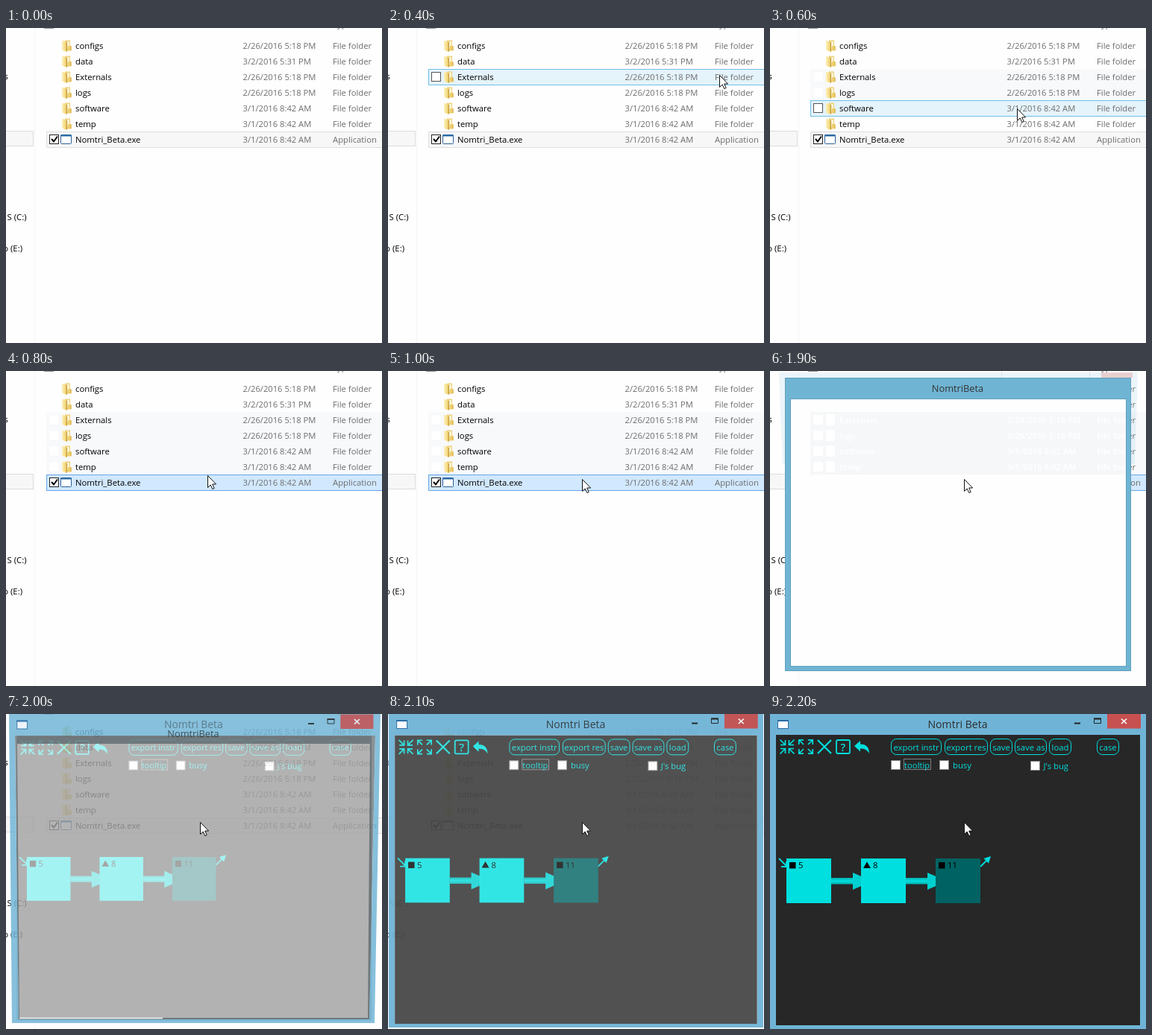
Animation, 504 px wide and 423 px high, one loop 2.5 s. Source, as an HTML page:

```html
<!DOCTYPE html>
<html lang="en">
<head>
<meta charset="utf-8">
<title>Opening an application</title>
<style>
  html, body { margin: 0; width: 100%; height: 100%; overflow: hidden; background: #fefefe; }
  svg { display: block; width: 504px; height: 423px; font: 11.3px "Open Sans", "Noto Sans", sans-serif; }
  text { white-space: pre; }
  .meta { fill: #6d6d6d; }
  .date { font-size: 11.2px; }
  .line { fill: none; stroke: #00dede; }
  .cyan { fill: #00dede; }
</style>
</head>
<body>
<svg viewBox="0 0 504 423">
  <defs>
    <linearGradient id="gold">
      <stop offset="0" stop-color="#fdf1bd"/><stop offset=".6" stop-color="#f5dd88"/><stop offset="1" stop-color="#e2bb4c"/>
    </linearGradient>
    <linearGradient id="shaft" x2="0" y2="1">
      <stop offset="0" stop-color="#00b0b0"/><stop offset=".5" stop-color="#00dede"/><stop offset="1" stop-color="#00b0b0"/>
    </linearGradient>
    <clipPath id="pane"><path d="M28 38H477V396H28Z"/></clipPath>
    <g id="folder">
      <path d="M5 .5H12V14H5Z" fill="#ecd07a"/>
      <path d="M7.5 2H11V13H7.5Z" fill="#fbf3d2"/>
      <path d="M1 .5 7.5 3V16L1 13.5Z" fill="url(#gold)"/>
      <path d="M7.5 3V15.5" stroke="#b9923a" stroke-width=".9"/>
      <path d="M9 8H13.5V14.5H8Z" fill="#efcf6c"/>
      <path d="M13 8.5V14" stroke="#cfa544" stroke-width=".9"/>
    </g>
    <path id="inward" d="M-9.5-9.5-3-3M-9-2.5H-2.5V-9"/>
    <path id="outward" d="M-3-3-9-9M-9.2-3V-9.2H-3"/>
  </defs>

  <g id="explorer">
    <path d="M38.5 0V423" stroke="#f5f5f5"/>
    <path d="M51 0H64" stroke="#707070" stroke-width="1.5"/>
    <text x="438" y="-1" class="meta">Type</text>
    <rect x="-2" y="138.5" width="38.5" height="20" fill="#f7f7f7" stroke="#dcdcdc"/>
    <g text-anchor="end">
      <text x="3" y="69">s</text>
      <text x="27.5" y="258">S (C:)</text>
      <text x="22" y="300">o (E:)</text>
    </g>
    <g id="bands"></g>
    <g id="rows"></g>
  </g>

  <g id="splash">
    <path d="M310.5 0V9M428.5 0V9" stroke="#ececec"/>
    <path d="M12 2H493L489 125H17Z" fill="#6fb4d3" opacity=".13"/>
    <path d="M444 2H486V9H444Z" fill="#e08a80" opacity=".35"/>
    <rect x="20.5" y="9.5" width="463" height="393" fill="#6fb4d3" stroke="#5f9fbc"/>
    <rect x="27.5" y="37.5" width="450" height="359" fill="#fefefe" stroke="#62a0bd"/>
    <rect x="54" y="55" width="423" height="84" fill="#f6f7f9"/>
    <g id="ghosts" fill="#fff" clip-path="url(#pane)"></g>
    <text x="251.5" y="28" font-size="12.8" text-anchor="middle" fill="#333">NomtriBeta</text>
  </g>

  <g id="app">
    <path id="veil" fill="#fff" opacity=".72"/>
    <g id="client">
      <rect x="8" y="28" width="488" height="390" fill="#272727"/>
      <g id="tools"></g>
      <g id="graph"></g>
    </g>
    <path id="ring" fill="#4c5a60" fill-rule="evenodd" opacity=".65"/>
    <path id="frame" fill="#6fb4d6" fill-rule="evenodd"/>
    <g id="bar">
      <rect x="10.5" y="8.5" width="14" height="11" fill="#fff" stroke="#2b6ba5"/>
      <path d="M10 9H25" stroke="#2b6ba5" stroke-width="2"/>
      <text id="title" x="251.5" y="19" font-size="14.1" text-anchor="middle" fill="#2c2c2c">Nomtri Beta</text>
      <path d="M408 12.5H416" stroke="#222" stroke-width="2"/>
      <path d="M434.5 6V12.5H443.5V6Z" fill="none" stroke="#222"/>
      <path d="M434 6.5H444" stroke="#222" stroke-width="2"/>
      <rect x="452" y="0" width="45" height="19.5" fill="#c75050"/>
      <path d="M471 6.5 478 13M478 6.5 471 13" stroke="#fff" stroke-width="1.7"/>
    </g>
    <g id="remains">
      <text x="251" y="31" font-size="12.8" text-anchor="middle" fill="#2c3438" opacity=".8">NomtriBeta</text>
      <path d="M18 408.5H210" stroke="#f4f8fa" stroke-width="1.5"/>
    </g>
  </g>

  <g id="busy" fill="none">
    <circle cx="274.5" cy="145.5" r="5.3" stroke="#2b96dc" stroke-width="4.4"/>
    <path d="M269.2 145.5A5.3 5.3 0 0 1 274.5 140.2" stroke="#58b6ea" stroke-width="3"/>
    <circle cx="274.5" cy="145.5" r="2.9" fill="#eaf5ff"/>
  </g>
  <path id="pointer" d="M.5.5V16.5L4.2 13 6.8 18.6 9.2 17.5 6.7 12H11.6Z" fill="#fff" stroke="#111"/>
</svg>

<script>
const $ = id => document.getElementById(id);

function add(parent, tag, attrs, text) {
  const node = document.createElementNS("http://www.w3.org/2000/svg", tag);
  for (const key in attrs) node.setAttribute(key, attrs[key]);
  if (text) node.textContent = text;
  parent.appendChild(node);
  return node;
}
const show = (node, on) => { node.style.display = on ? "" : "none"; };
const box = (parent, x, y, w, h, attrs) => add(parent, "rect", { x, y, width: w, height: h, ...attrs });
const path = (parent, d, attrs) => add(parent, "path", { d, ...attrs });
const label = (parent, x, y, text, attrs) => add(parent, "text", { x, y, ...attrs }, text);

// File list
const FEB = "2/26/2016 5:18 PM", MAR = "3/1/2016 8:42 AM";
const files = [
  ["configs", FEB], ["data", "3/2/2016 5:31 PM"], ["Externals", FEB], ["logs", FEB],
  ["software", MAR], ["temp", MAR], ["Nomtri_Beta.exe", MAR]
];
const EXE = files.length - 1;
const rowY = i => 24 + 21 * i;

const rows = files.map(([name, date], i) => {
  const y = rowY(i), g = $("rows");
  const band = box($("bands"), 54.5, y - 10.5, 460, 21);
  const check = box(g, 58.5, y - 6.5, 12, 12, { fill: "#fff" });
  if (i === EXE) {
    path(g, `M61 ${y - 1}l3 3.5 5-7`, { fill: "none", stroke: "#000", "stroke-width": 2 });
    box(g, 73.5, y - 6.5, 14, 12, { fill: "#fff", stroke: "#2b5f96", rx: 1 });
    path(g, `M73 ${y - 5.5}h15`, { stroke: "#2b6ba5", "stroke-width": 2 });
  } else {
    add(g, "use", { href: "#folder", x: 74, y: y - 8 });
  }
  label(g, 93, y + 4, name);
  label(g, 317.5, y + 4, date, { class: "meta date" });
  label(g, 438, y + 4, i === EXE ? "Application" : "File folder", { class: "meta" });
  return { band, check };
});

for (let i = 2; i < EXE; i++) {
  const y = rowY(i), g = $("ghosts");
  box(g, 58, y - 7, 13, 13);
  box(g, 75, y - 8, 12, 15);
  label(g, 93, y + 4, files[i][0], { "font-weight": 600 });
  label(g, 317.5, y + 4, files[i][1], { class: "date", "font-weight": 600 });
  label(g, 438, y + 4, "File folder", { "font-weight": 600 });
}

function paintRows(hover, seen, active) {
  rows.forEach(({ band, check }, i) => {
    let fill = "none", stroke = "none", mark = "none";
    if (i === EXE) {
      [fill, stroke] = active ? ["#d1e8ff", "#66a7e8"] : ["#f7f7f7", "#dedede"];
      mark = "#222";
    } else if (i === hover) {
      [fill, stroke, mark] = ["#e5f3fb", "#70c0e7", "#555"];
    } else if (i >= 2 && i < seen) {
      fill = "#f8f9fb";
    }
    band.setAttribute("fill", fill);
    band.setAttribute("stroke", stroke);
    check.setAttribute("stroke", mark);
    show(check, mark !== "none" || fill !== "none");
  });
}

// Toolbar
const tools = $("tools");
[["#inward", 23], ["#outward", 48]].forEach(([href, x]) => {
  for (let turn = 0; turn < 360; turn += 90)
    add(tools, "use", { href, class: "line", "stroke-width": 1.7, transform: `translate(${x} 44) rotate(${turn})` });
});
path(tools, "M64 35 82 53M82 35 64 53", { class: "line", "stroke-width": 2.2 });
box(tools, 89, 35, 18, 18, { class: "line", "stroke-width": 1.8, rx: 2 });
label(tools, 98, 49.5, "?", { class: "cyan", "font-size": 15, "font-weight": 600, "text-anchor": "middle" });
path(tools, "M113 43 121 36V40.5C129 40.5 133 45 133 53 130 48 127 46.5 121 46.5V50.5Z", { class: "cyan" });

[["export instr", 162, 230], ["export res", 234, 292], ["save", 295, 325],
 ["save as", 328, 371], ["load", 374, 404], ["case", 438, 468]].forEach(([text, l, r]) => {
  box(tools, l + .5, 33.5, r - l - 1, 21, { class: "line", rx: 7 });
  label(tools, (l + r) / 2, 48.5, text, { class: "cyan", "text-anchor": "middle" });
});
[["tooltip", 162, 180], ["busy", 227, 245], ["J's bug", 349, 366.5]].forEach(([text, x, tx], i) => {
  const y = i === 2 ? 63 : 62;
  box(tools, x + .5, y + .5, 12, 12, { fill: "#fff", stroke: "#8a8a8a" });
  label(tools, tx, y + 11, text, { class: "cyan" });
});
box(tools, 179.5, 60.5, 36, 14, { fill: "none", stroke: "#d8d8d8", "stroke-dasharray": "1 1" });

// Node graph
const graph = $("graph");
for (const x of [82, 182]) {
  box(graph, x, 220, 30, 8.5, { fill: "url(#shaft)" });
  path(graph, `M${x + 29} 213 ${x + 55} 224.5 ${x + 29} 236Z`, { fill: "#00cfcf" });
}
path(graph, "M12 194 23 205M22 198V205H15", { class: "line", "stroke-width": 1.8 });
path(graph, "M282 205 292 195", { class: "line", "stroke-width": 1.8 });
path(graph, "M296 191 286.5 194 293 200.5Z", { class: "cyan" });
[[22, "5"], [122, "8"], [222, "11"]].forEach(([x, text], i) => {
  box(graph, x, 194, 60, 60, { fill: i === 2 ? "#006262" : "#00dfdf" });
  path(graph, i === 1 ? `M${x + 3} 207h10l-5-8.5z` : `M${x + 4} 199h8.5v8.5h-8.5z`);
  label(graph, x + 16, 207, text);
});

// Window opening: outer edge, inner edge, placement and opacity at each step
const poly = p => "M" + p.join(" ") + "Z";
const rect = (l, t, r, b) => [l, t, r, t, r, b, l, b];
const opening = [
  { at: 2000, outer: [4, 0, 502, 0, 494, 415, 8, 415], inner: [12, 29, 495, 29, 487, 410, 17, 410],
    glass: [15, 40, 488, 40, 485, 408, 18, 408],
    move: "matrix(.975 0 0 .98 6.5 1.9)", barMove: "matrix(.982 0 0 1 4.4 .5)",
    client: .35, frame: .84, title: .55 },
  { at: 2100, outer: rect(1, 0, 503, 421), inner: rect(9, 28.5, 495, 416),
    move: "matrix(.995 0 0 .995 1.2 .6)", barMove: "matrix(.995 0 0 1 1.2 0)",
    client: .8, frame: .95, title: .9 },
  { at: 2200, outer: rect(0, 0, 504, 423), inner: rect(8, 28, 496, 418),
    move: "", barMove: "", client: 1, frame: 1, title: 1 }
];

function paintApp(s) {
  $("frame").setAttribute("d", poly(s.outer) + poly(s.inner));
  $("frame").setAttribute("opacity", s.frame);
  $("veil").setAttribute("d", poly(s.inner));
  $("ring").setAttribute("d", s.glass ? poly(s.inner) + poly(s.glass) : "");
  $("client").setAttribute("transform", s.move);
  $("client").setAttribute("opacity", s.client);
  $("bar").setAttribute("transform", s.barMove);
  $("bar").setAttribute("opacity", s.frame);
  $("title").setAttribute("opacity", s.title);
  show($("remains"), s.glass);
}

// Pointer steps: time, x, y, hovered row
const trail = [
  [400, 444, 63, 2], [500, 387, 86, 3], [600, 331, 108, 4],
  [700, 293, 127, 5], [800, 270, 140, 6], [900, 263, 142, 6], [1000, 260, 145, 6]
];
const latest = (list, test) => list.filter(test).pop();

function draw(t) {
  const p = latest(trail, s => s[0] <= t);
  const app = latest(opening, s => s.at <= t);
  show($("pointer"), p);
  if (p) $("pointer").setAttribute("transform", `translate(${p[1]} ${p[2]})`);
  paintRows(p ? p[3] : -1, p && !app ? p[3] : 0, p && p[3] === EXE && !app);
  show($("busy"), t >= 1400 && t < 1900);
  show($("splash"), t >= 1900 && t < 2000);
  show($("app"), app);
  if (app) paintApp(app);
}

const start = performance.now();
let last = -1;
function tick() {
  const t = Math.floor(((performance.now() - start) % 2500) / 100) * 100;
  if (t !== last) draw(last = t);
  requestAnimationFrame(tick);
}
tick();
</script>
</body>
</html>
```
